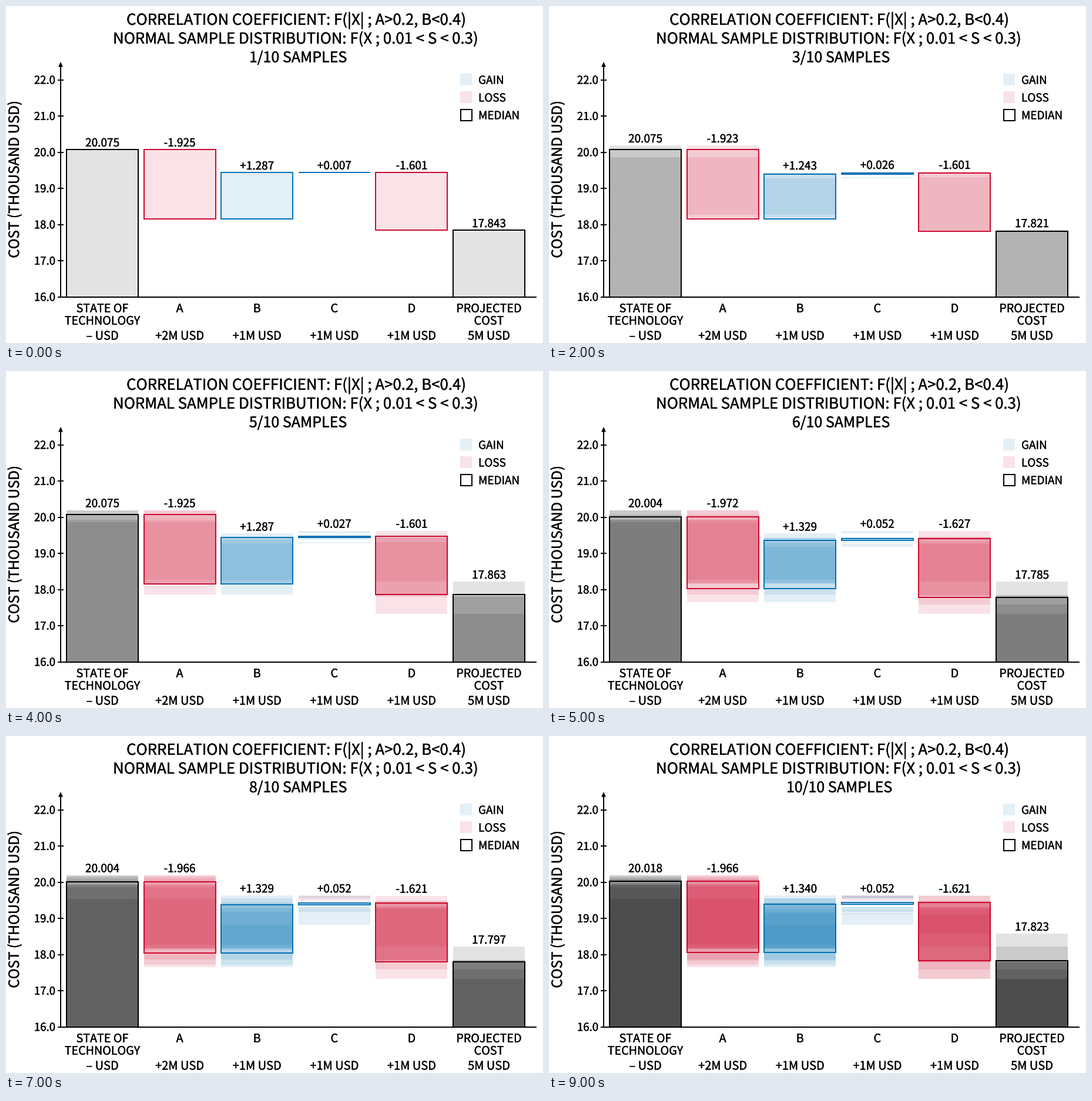
These frames come from a looping animation (914 by 573 pixels, 10000 ms). A matplotlib script:

```python
import numpy as np
import matplotlib.pyplot as plt
from matplotlib.animation import FuncAnimation
from matplotlib.patches import Polygon, Rectangle
from matplotlib.patheffects import withStroke

W, H, DPI = 914, 573, 64
PT = 72 / DPI  # points per pixel
BLACK, BLUE, RED = "#000000", "#0271b5", "#cc092f"
ALPHA = 0.11
BASE, Y0, UNIT = 16.0, 494.5, 61.5
BAR_X, PITCH, BAR_W = 103, 131.6, 122

# start cost, then the change made by A, B, C and D
SAMPLES = np.array([
    [20.0750, -1.9246, 1.2870, 0.0070, -1.6010],
    [19.8650, -1.6796, 1.2433, 0.0271, -1.6526],
    [20.1870, -1.9228, 1.0130, 0.0262, -1.4800],
    [19.9338, -2.0710, 1.5080, 0.0762, -2.1220],
    [20.1950, -2.0202, 1.3702, 0.0810, -1.4080],
    [19.9250, -2.2750, 1.5290, 0.0762, -1.6710],
    [19.5360, -1.8260, 1.1100, 0.4900, -1.5300],
    [20.1400, -2.0082, 1.5010, -0.1450, -1.6410],
    [19.9618, -2.1400, 1.3102, -0.0200, -1.7800],
    [20.0900, -1.9150, 1.3750, 0.0790, -1.0520],
])

plt.rcParams["font.family"] = ["Noto Sans CJK JP", "DejaVu Sans"]
fig = plt.figure(figsize=(W / DPI, H / DPI), dpi=DPI, facecolor="white")
ax = fig.add_axes([0, 0, 1, 1])
ax.set_xlim(0, W)
ax.set_ylim(H, 0)
ax.axis("off")


def to_y(cost):
    return Y0 - UNIT * (cost - BASE)


def baseline(yc, em):
    return yc + 0.366 * em


def label(x, yc, s, em, ha="center"):
    return ax.text(x, baseline(yc, em), s, fontsize=em * PT, ha=ha,
                   va="baseline", color=BLACK, zorder=5,
                   path_effects=[withStroke(linewidth=0.35 * PT, foreground=BLACK)])


def line(x0, y0, x1, y1):
    ax.plot([x0, x1], [y0, y1], color=BLACK, lw=2 * PT,
            solid_capstyle="butt", zorder=4)


def box(x, y, w, h, fill=None, edge=None):
    style = dict(fc=fill, alpha=ALPHA, lw=0) if fill else dict(fc="none", ec=edge, lw=2 * PT)
    return ax.add_patch(Rectangle((x, y), w, h, joinstyle="miter",
                                  zorder=2 if fill else 3, **style))


def bars(row):
    """Low end, high end and colour of the six waterfall bars."""
    levels = np.cumsum(row)
    out = [(BASE, levels[0], BLACK)]
    for a, b in zip(levels[:-1], levels[1:]):
        out.append((min(a, b), max(a, b), BLUE if b >= a else RED))
    out.append((BASE, levels[-1], BLACK))
    return out


def draw_static():
    label(493.5, 22.5, "CORRELATION COEFFICIENT: F(|X| ; A>0.2, B<0.4)", 25.8)
    label(492.5, 54.5, "NORMAL SAMPLE DISTRIBUTION: F(X ; 0.01 < S < 0.3)", 25.8)
    ax.text(28, 295, "COST (THOUSAND USD)", fontsize=24.1 * PT, rotation=90,
            ha="right", va="center", rotation_mode="default", color=BLACK,
            path_effects=[withStroke(linewidth=0.35 * PT, foreground=BLACK)])

    line(93, Y0 + 1, 93, 101)
    ax.add_patch(Polygon([(93, 95), (97, 103.5), (89, 103.5)], fc=BLACK, lw=0, zorder=4))
    line(88, Y0, 903, Y0)
    for cost in range(16, 23):
        y = to_y(cost)
        line(88, y, 98, y)
        label(84, y, f"{cost:.1f}", 18.6, "right")

    names = ["STATE OF\nTECHNOLOGY", "A", "B", "C", "D", "PROJECTED\nCOST"]
    spend = ["– USD", "+2M USD", "+1M USD", "+1M USD", "+1M USD", "5M USD"]
    for i, (name, usd) in enumerate(zip(names, spend)):
        x = BAR_X + PITCH * i + BAR_W / 2
        for k, part in enumerate(name.split("\n")):
            label(x, 513.5 + 21 * k, part, 19.7)
        label(x, 560, usd, 20)

    box(773, 115, 20, 20, fill=BLUE)
    box(773, 145, 20, 20, fill=RED)
    box(774, 175.5, 19, 19, edge=BLACK)
    for k, s in enumerate(["GAIN", "LOSS", "MEDIAN"]):
        label(804, 125.5 + 30 * k, s, 18.9, "left")


draw_static()
layers = [[box(BAR_X + PITCH * i, to_y(hi), BAR_W, UNIT * (hi - lo), fill=color)
           for i, (lo, hi, color) in enumerate(bars(row))] for row in SAMPLES]
tops = np.array([[hi for _, hi, _ in bars(row)] for row in SAMPLES])
medians = [box(BAR_X + PITCH * i, Y0, BAR_W, 0, edge=BLACK) for i in range(6)]
values = [label(BAR_X + PITCH * i + BAR_W / 2, 0, "", 19) for i in range(6)]
counter = label(497, 86.5, "", 25)


def update(frame):
    n = frame + 1
    for k, layer in enumerate(layers):
        for patch in layer:
            patch.set_visible(k < n)

    mid = np.median(SAMPLES[:n], axis=0)
    texts = [f"{mid[0]:.3f}"] + [f"{d:+.3f}" for d in mid[1:]] + [f"{mid.sum():.3f}"]
    for i, (lo, hi, color) in enumerate(bars(mid)):
        medians[i].set_y(to_y(hi))
        medians[i].set_height(UNIT * (hi - lo))
        medians[i].set_edgecolor(color)
        top = max(hi, tops[:n, i].max())
        values[i].set_y(baseline(to_y(top) - 12, 19))
        values[i].set_text(texts[i])

    counter.set_text(f"{n}/{len(SAMPLES)} SAMPLES")
    counter.set_x(497 if n < 10 else 494)
    return [counter, *values, *medians]


anim = FuncAnimation(fig, update, frames=len(SAMPLES), interval=1000,
                     repeat=True, repeat_delay=0, blit=False)
plt.show()
```
